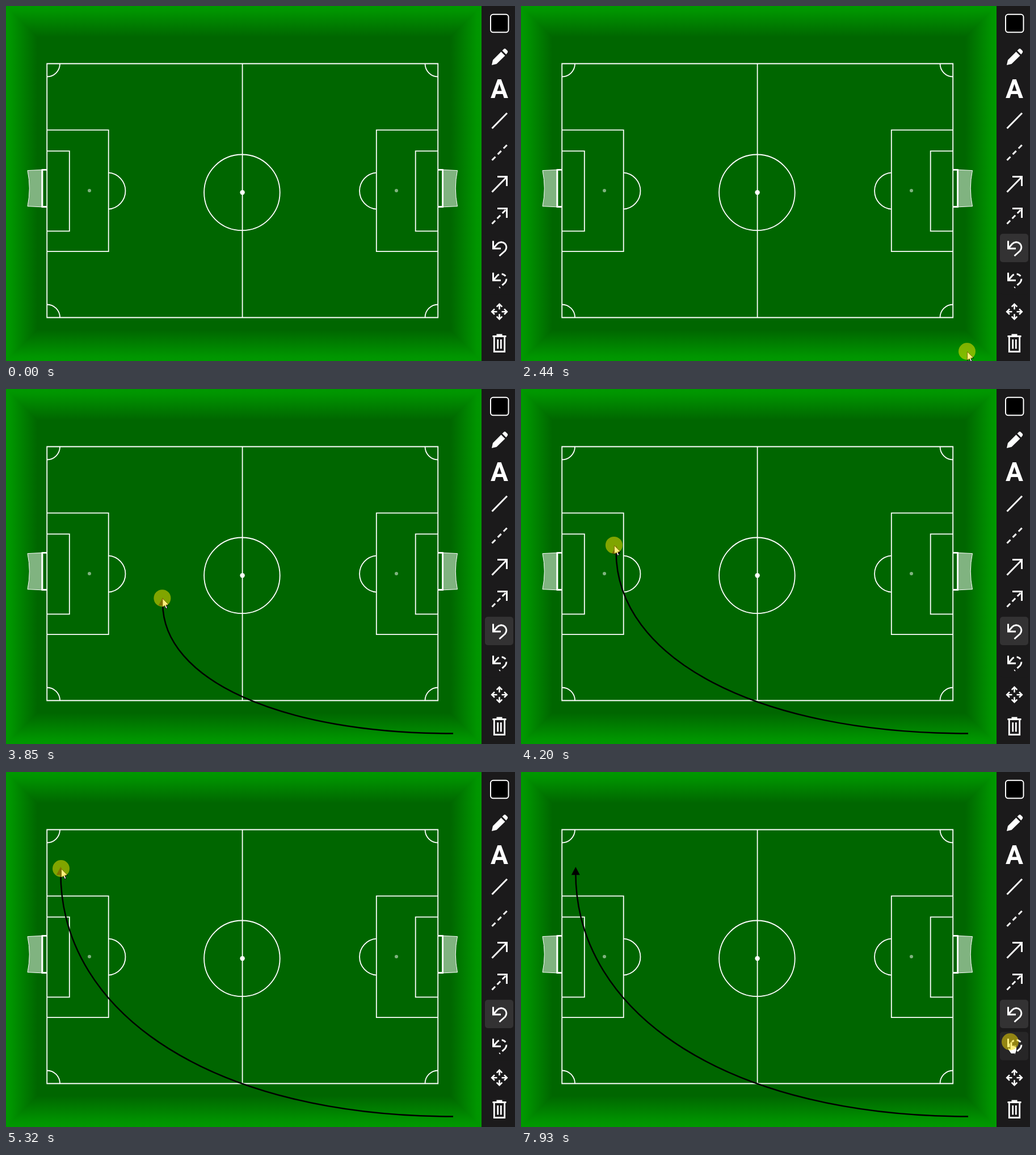
Recreate the animation shown at these times as an HTML page. Size 897 by 625 pixels, loop 8000 ms.

```html
<!DOCTYPE html>
<html lang="en">
<head>
<meta charset="utf-8">
<title>Tactics board</title>
<style>
html, body { margin: 0; width: 100%; height: 100%; overflow: hidden; background: #1b1a1b; }
svg { display: block; width: 897px; height: 625px; }
.line { fill: none; stroke: #fff; stroke-width: 1.8; }
.icon { fill: none; stroke: #fff; stroke-width: 3; }
</style>
</head>
<body>
<svg viewBox="0 0 897 625">
  <defs>
    <linearGradient id="sides">
      <stop offset="0" stop-color="#009900"/><stop offset=".01" stop-color="#009500"/>
      <stop offset=".066" stop-color="#006600"/><stop offset=".934" stop-color="#006600"/>
      <stop offset=".99" stop-color="#009500"/><stop offset="1" stop-color="#009900"/>
    </linearGradient>
    <linearGradient id="edge" x2="0" y2="1">
      <stop offset="0" stop-color="#009900"/><stop offset=".15" stop-color="#009500"/>
      <stop offset="1" stop-color="#006600"/>
    </linearGradient>
    <path id="band" d="M0 0H838L783 55H55Z" fill="url(#edge)"/>
    <g id="half">
      <path class="line" d="M72 218.3H180.7V432.2H72M72 255.4H111.8V396.4H72
        M180.7 293.3A32.3 32.3 0 0 1 180.7 357.7
        M95 101.5A23 23 0 0 1 72 124.5M72 525.5A23 23 0 0 1 95 548.5"/>
      <path d="M38 289.6L63 288.4V353.8L38 352.6Q44.500 321 38 289.600Z" fill="#80b380" stroke="#fff"/>
      <path d="M72 288.300H64V353.500H72" fill="none" stroke="#fff" stroke-width="2.8"/>
    </g>
    <path id="undoHead" d="M858.500 413.500V427H872"/>
  </defs>

  <rect width="838" height="625" fill="url(#sides)"/>
  <use href="#band"/>
  <use href="#band" transform="matrix(1 0 0 -1 0 625)"/>

  <path class="line" d="M72.200 101.500H761.200V548.500H72.200ZM416.600 101.500V548.500"/>
  <circle class="line" cx="415.900" cy="328.300" r="66.800"/>
  <circle cx="416.600" cy="328.200" r="4.200" fill="#fff"/>
  <use href="#half"/>
  <use href="#half" transform="matrix(-1 0 0 1 833.500 0)"/>
  <g fill="#80b380"><circle cx="147" cy="325" r="3"/><circle cx="688" cy="325" r="3"/></g>

  <g id="drawing">
    <path id="curve" fill="none" stroke="#000" stroke-width="2.5"/>
    <path id="head" d="M0 0L7.500 14.200H-7.500Z"/>
  </g>

  <rect x="838" width="59" height="625" fill="#1b1a1b"/>
  <rect id="undoBg" x="844" y="401" width="50" height="50" rx="5"/>
  <rect id="redoBg" x="844" y="457.500" width="50" height="50" rx="5"/>

  <g class="icon">
    <rect x="854" y="14.800" width="31.500" height="31.500" rx="4.500" fill="#000" stroke-width="2"/>
    <path d="M872.500 80.500L879.500 87.500L864.500 102L856 104L858 95ZM874.500 78.500L877.300 75.700Q879 74.200 880.600 75.700L883.700 78.800Q885 80.400 883.700 82.200L881.300 85.300Z" fill="#fff" stroke="none"/>
    <text x="869.500" y="162" text-anchor="middle" font-family="Roboto, 'Liberation Sans', sans-serif" font-weight="700" font-size="46" fill="#fff" stroke="none">A</text>
    <path d="M856.500 215.500L883 188.500"/>
    <path d="M856.500 271.500L883 244.500" stroke-dasharray="8.500 6"/>
    <path d="M856.500 327.500L882 301.500M866 300.500H882.500V317"/>
    <path d="M856.500 383.500L882 357.500" stroke-dasharray="8 5"/>
    <path d="M866 356.500H882.500V373"/>
    <use href="#undoHead"/>
    <path d="M859 426.500L866 418.500A9.200 9.200 0 0 1 879.500 431L869.500 440"/>
    <use href="#undoHead" y="56"/>
    <path d="M859 482.500L866 474.500A9.200 9.200 0 0 1 879.500 487L869.500 496" stroke-dasharray="14 5 8 5"/>
    <g id="move" stroke-width="2.600"></g>
    <path d="M857.500 581.500H881.500M864.500 579H874.500M860.300 582V608.500H878.700V582M866.700 587V603.500M872.300 587V603.500" stroke-width="2.800"/>
  </g>

  <g id="cursor" stroke="#000" fill="#fff" stroke-linejoin="round">
    <path id="arrow" d="M.500 .500V16L4 12.700L6.500 18.500L9 17.500L6.600 11.800H11.500Z"/>
    <path id="hand" d="M0 1Q2 -1.500 4 1V7Q5.800 5.500 7 7.500Q9 6.500 9.500 8.500Q11.500 8 11.500 10.500V15L9.500 21H1.500L-3.500 13.500Q-4.500 10.500 -2 10.800L0 12.500Z" stroke-width=".8"/>
  </g>
  <circle id="press" r="15" fill="#ffe400" fill-opacity=".5"/>
</svg>
<script>
const LOOP = 8000;
const el = id => document.getElementById(id);
const show = (id, on) => el(id).setAttribute('visibility', on ? 'visible' : 'hidden');
const place = (id, x, y) => el(id).setAttribute('transform', `translate(${x} ${y})`);

el('move').innerHTML = [0, 90, 180, 270].map(a =>
  `<path transform="translate(869.5 538.2) rotate(${a})" d="M0 -4V-13M-4.800 -8.500L0 -13.300L4.800 -8.500"/>`).join('');

// Pointer path: time, x, y
const keys = [
  [430, 900, 434], [860, 871, 420], [1290, 871, 420], [1980, 786, 608], [2630, 786, 608],
  [3100, 532, 533], [3440, 301, 408], [3850, 276, 369], [4270, 147, 257], [4560, 111, 198],
  [5120, 98.5, 170], [5320, 97, 170], [6130, 97, 170], [6760, 707, 489], [6960, 707, 489],
  [7400, 800, 502], [7790, 861, 476], [7860, 862, 475]
];

// Stretches of movement: start, end, number of steps
const moves = [
  [500, 860, 6], [1360, 1980, 10], [2700, 3440, 12], [3510, 4270, 12], [4340, 5120, 12],
  [5190, 5320, 3], [6200, 6760, 9], [7030, 7790, 12], [7860, 7930, 2]
];

const presses = [[1010, 1080], [2440, 5720], [7930, LOOP]];

function stepTime(t) {
  const move = moves.filter(m => m[0] <= t).pop();
  if (!move) return t;
  const [start, end, count] = move;
  const step = (end - start) / (count - 1);
  return Math.min(end, start + Math.floor((t - start) / step + 0.1) * step);
}

const slope = (i, axis) => (keys[i + 1][axis] - keys[i][axis]) / (keys[i + 1][0] - keys[i][0]);

// Monotone tangent: harmonic mean of the neighbouring slopes
function tangent(i, axis) {
  if (i === 0 || i === keys.length - 1) return 0;
  const a = slope(i - 1, axis), b = slope(i, axis);
  return a * b > 0 ? 2 * a * b / (a + b) : 0;
}

function pointer(t) {
  const last = keys.length - 1;
  if (t <= keys[0][0]) return keys[0].slice(1);
  if (t >= keys[last][0]) return keys[last].slice(1);
  const i = keys.findIndex(k => k[0] > t) - 1;
  const span = keys[i + 1][0] - keys[i][0];
  const u = (t - keys[i][0]) / span;
  return [1, 2].map(axis => {
    const p = keys[i][axis], q = keys[i + 1][axis];
    return p + (q - p) * u * u * (3 - 2 * u)
      + span * u * (1 - u) * ((1 - u) * tangent(i, axis) - u * tangent(i + 1, axis));
  });
}

function drawArrow(t) {
  const [px, py] = pointer(Math.min(t, 5320) - 14);
  const x = px - 0.7, y = py - 3;
  const x0 = 788, y0 = 606.5, bend = 0.6;
  const endY = Math.min(y0, y + 10);
  el('curve').setAttribute('d',
    `M${x0} ${y0}C${x0 + (x - x0) * bend} ${y0} ${x} ${y + (y0 - y) * bend} ${x} ${endY}`);
  place('head', x, y);
}

function render(t) {
  const time = stepTime(t);
  const [x, y] = pointer(time);
  const overBar = x > 844 && x < 894;
  const visible = t >= 500;

  show('drawing', t >= 2700);
  if (t >= 2700) drawArrow(time);

  const overUndo = visible && overBar && y > 401 && y < 451;
  const overRedo = visible && overBar && y > 457 && y < 508;
  el('undoBg').setAttribute('fill', t >= 1080 ? '#333233' : overUndo ? '#272627' : '#1b1a1b');
  el('redoBg').setAttribute('fill', overRedo ? '#272627' : '#1b1a1b');

  place('cursor', x, y);
  show('arrow', visible && !overBar);
  show('hand', visible && overBar);
  place('press', x, y);
  show('press', presses.some(([from, to]) => t >= from && t < to));
}

const begin = performance.now();
function tick() {
  render((performance.now() - begin) % LOOP);
  requestAnimationFrame(tick);
}
tick();
</script>
</body>
</html>
```
